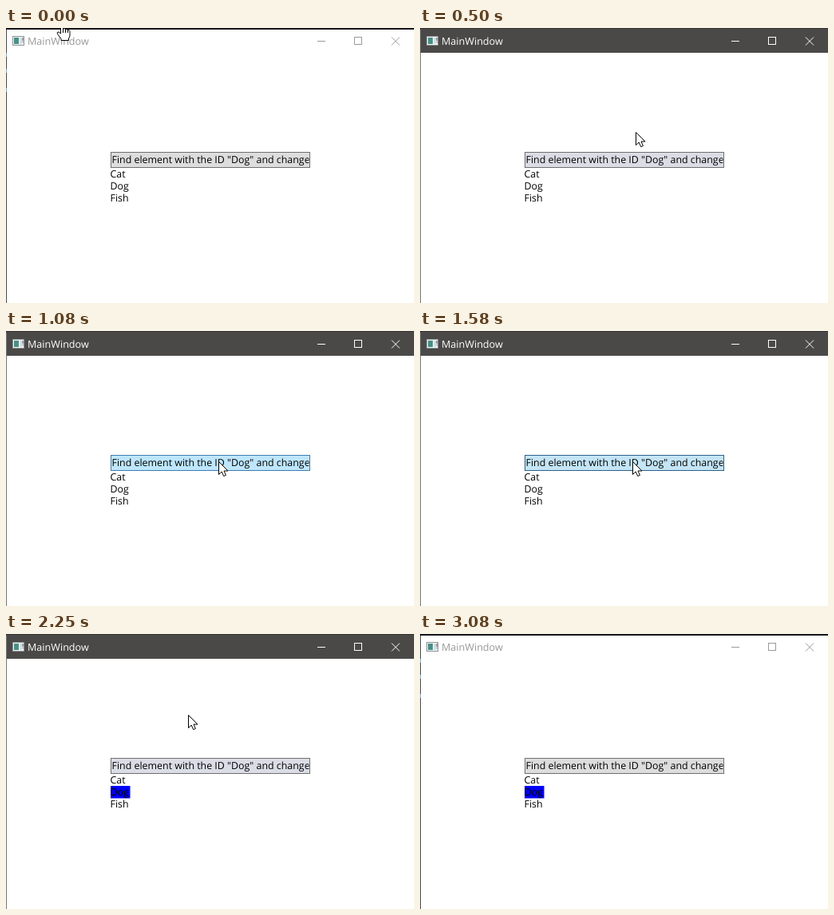
Animation, 511 px wide and 344 px high, one loop 3.17 s. Source, as an HTML page:

```html
<!DOCTYPE html>
<html lang="en">
<head>
<meta charset="utf-8">
<title>MainWindow</title>
<style>
  html, body { margin: 0; width: 100%; height: 100%; overflow: hidden; background: #fff; }
  svg { display: block; width: 511px; height: 344px; }
  text { font: 12.4px "Open Sans", "Noto Sans", sans-serif; text-rendering: geometricPrecision; white-space: pre; }
  .bar { fill: #fff; }
  .top { fill: #17171c; }
  .edge { fill: #4a4a4c; }
  .title { font-size: 12.6px; fill: #999; }
  .controls { fill: none; stroke: #999; }
  .active .bar { fill: #4b4947; }
  .active .top { fill: #363432; }
  .active .edge { fill: #777; }
  .active .glow { display: none; }
  .active .title { fill: #fff; }
  .active .controls { stroke: #fff; }
  .button { fill: #ddd; stroke: #707070; }
  .active .button { fill: #dbdde6; }
  .hover .button { fill: #bee6fd; stroke: #3c7fb1; }
  .pressed .button { fill: #c4e5f6; stroke: #2c628b; }
  .mark { fill: #00f; visibility: hidden; }
  .found .mark { visibility: visible; }
  .pointer { fill: #fff; stroke: #000; stroke-linejoin: round; }
</style>
</head>
<body>
<svg id="stage" viewBox="0 0 511 344">
  <defs>
    <clipPath id="inner"><rect x="132" y="156" width="247.5" height="18"/></clipPath>
  </defs>
  <rect width="511" height="344" fill="#fff"/>
  <rect class="bar" width="511" height="31"/>
  <rect class="top" width="511" height="1"/>
  <rect class="top glow" y="1" width="511" height="1"/>
  <rect class="edge" y="2" width="1" height="342"/>
  <path class="glow" d="M.5 31V36M.5 51V56M.5 75V80" stroke="#8fa9bd"/>

  <rect x="8.5" y="10.5" width="14" height="11" fill="#f5f5f5" stroke="#8c9296"/>
  <rect x="10" y="12" width="6" height="8" fill="#4a8f86"/>
  <rect x="17" y="12" width="3" height="8" fill="#d9dde0"/>
  <path d="M21 12v4M21 17v1" stroke="#4a4f60"/>
  <text class="title" x="27" y="21">MainWindow</text>
  <g class="controls">
    <path d="M390 16.5h10"/>
    <rect x="436.5" y="11.5" width="9" height="9"/>
    <path d="M483 11.5l10 10M493 11.5l-10 10"/>
  </g>

  <rect class="button" x="131.5" y="155.5" width="249" height="19"/>
  <text x="132.6" y="169.3" clip-path="url(#inner)">Find element with the ID "Dog" and change its background</text>
  <rect class="mark" x="131" y="190" width="24.5" height="15.5"/>
  <text x="130.5" y="186.8">Cat</text>
  <text x="130.5" y="202">Dog</text>
  <text x="130.5" y="217.3">Fish</text>

  <path id="arrow" class="pointer" d="M.5.5V16.5L4.2 13L6.7 18.6L9.4 17.4L7 12H12Z"/>
  <path id="hand" class="pointer" d="M-1.5 13V2Q-1.5.5 0 .5T1.5 2V8Q1.5 6.5 3 6.5T4.5 8Q5 7.2 6 7.4T7.4 9Q8 8.3 9 8.8T10 10.5V15Q10 17 8.5 19V21.5H-1V19.5L-5.5 13.5Q-6.5 11.5-5 11T-2.8 12.2ZM1.5 8V12M4.5 8V12M7.4 9V12"/>
</svg>
<script>
  const LOOP = 3170, STEP = 250 / 3;
  const stage = document.getElementById('stage');
  const arrow = document.getElementById('arrow');
  const hand = document.getElementById('hand');

  // Pointer stops: step, x, y
  const path = [
    [0, 70, -6], [5, 269, 128], [7, 271, 132], [10, 273, 150], [13, 266, 163],
    [19, 266, 163], [21, 276, 134], [25, 273, 128], [32, 44, -6]
  ];

  const ease = u => u * u * (3 - 2 * u);
  const within = (k, from, to) => k >= from && k < to;

  function pointerAt(k) {
    const i = Math.max(1, path.findIndex(p => p[0] >= k));
    const [k0, x0, y0] = path[i - 1], [k1, x1, y1] = path[i];
    const u = ease((k - k0) / (k1 - k0));
    return [x0 + (x1 - x0) * u, y0 + (y1 - y0) * u].map(Math.round);
  }

  function show(el, visible) {
    el.style.visibility = visible ? 'visible' : 'hidden';
  }

  function draw() {
    const k = Math.floor((performance.now() % LOOP + 6.7) / STEP);
    const toggle = (name, on) => stage.classList.toggle(name, on);
    toggle('active', within(k, 6, 37));
    toggle('hover', within(k, 11, 20));
    toggle('pressed', k === 19);
    toggle('found', k >= 20);
    show(hand, k === 0);
    show(arrow, within(k, 1, 33));
    if (k < 33) {
      const [x, y] = pointerAt(Math.min(k, 32));
      for (const el of [arrow, hand]) el.setAttribute('transform', `translate(${x} ${y})`);
    }
    requestAnimationFrame(draw);
  }
  draw();
</script>
</body>
</html>
```
